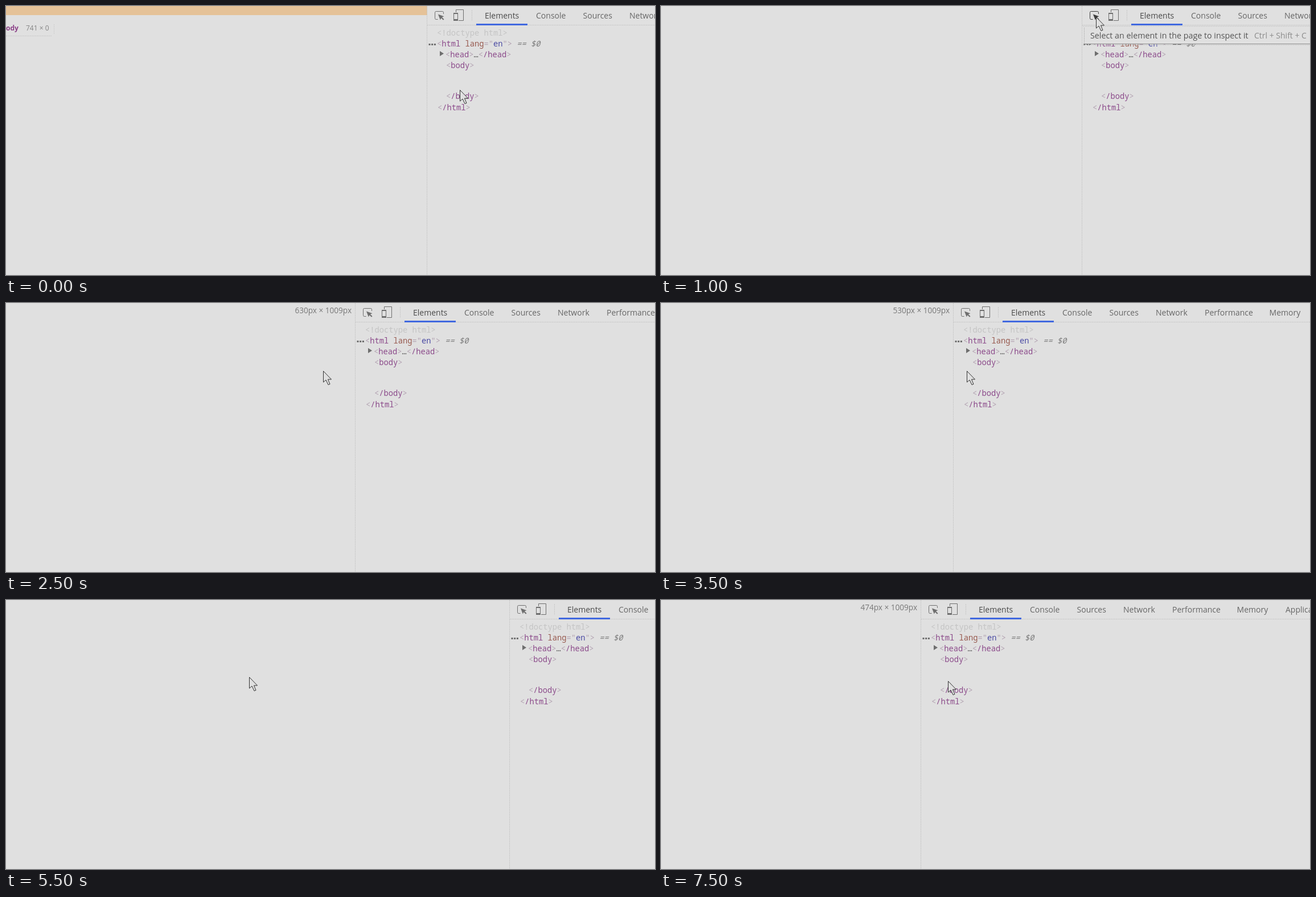
An HTML page with a canvas for the animation above (8 s loop, 1140 px wide and 472 px high).

```html
<!DOCTYPE html>
<html lang="en">
<head>
<meta charset="utf-8">
<title>Resizing the inspector</title>
<style>
  html, body { margin: 0; width: 100%; height: 100%; overflow: hidden; background: #e0e0e0; }
  canvas { display: block; width: 1140px; height: 472px; }
</style>
</head>
<body>
<canvas id="stage" width="1140" height="472"></canvas>
<script>
const ctx = document.getElementById('stage').getContext('2d');
const W = 1140, H = 472, LOOP = 8000;
const BG = '#e0e0e0', RULE = '#c6c6c6', ICON = '#6e6e6e', DARK = '#3c3c3c';
const SANS = '"Open Sans", "Noto Sans", sans-serif';
const MONO = '13.75px "Noto Sans Mono", "DejaVu Sans Mono", monospace';
const CHAR = 8.25;
const INK = {
  b: '#b3a3b2', t: '#8b4a8a', a: '#97594e', v: '#4a4aa3', g: '#c4c4c4', n: '#7c7c7c', d: '#555'
};

// edge: left side of the inspector; x, y: pointer tip
const steps = [
  { t: 0,    edge: 740, x: 797,  y: 147, body: true },
  { t: 500,  edge: 740, x: 1038, y: 6 },
  { t: 1000, edge: 740, x: 764,  y: 19, hint: true },
  { t: 1500, edge: 740, x: 732,  y: 115 },
  { t: 2000, edge: 740, x: 741,  y: 119 },
  { t: 2500, edge: 614, x: 557,  y: 119, size: 630 },
  { t: 3500, edge: 514, x: 537,  y: 119, size: 530 },
  { t: 4500, edge: 790, x: 840,  y: 127, size: 807 },
  { t: 5500, edge: 885, x: 427,  y: 135 },
  { t: 6500, edge: 285, x: 277,  y: 135, size: 302, red: true },
  { t: 7500, edge: 457, x: 504,  y: 142, size: 474 }
];

const tabs = [['Elements', 101], ['Console', 191], ['Sources', 273.5], ['Network', 355],
  ['Performance', 441], ['Memory', 554.5], ['Application', 640], ['Security', 745], ['Audits', 827.5]];

// x offset, baseline, then [ink, text] runs
const code = [
  [17, 52, [['g', '<!doctype html>']]],
  [17, 71, [['b', '<'], ['t', 'html'], ['a', ' lang'], ['b', '="'], ['v', 'en'], ['b', '">'], ['n', ' == $0', 'italic ']]],
  [32, 90, [['b', '<'], ['t', 'head'], ['b', '>'], ['d', '…'], ['b', '<'], ['t', '/head'], ['b', '>']]],
  [33, 109, [['b', '<'], ['t', 'body'], ['b', '>']]],
  [33, 163, [['b', '<'], ['t', '/body'], ['b', '>']]],
  [18, 183, [['b', '<'], ['t', '/html'], ['b', '>']]]
];

function rect(x, y, w, h, color) {
  ctx.fillStyle = color;
  ctx.fillRect(x, y, w, h);
}

function text(str, x, y, font, color, align = 'left') {
  ctx.font = font;
  ctx.fillStyle = color;
  ctx.textAlign = align;
  ctx.fillText(str, x, y);
}

function path(points, closed = true) {
  ctx.beginPath();
  points.forEach(([x, y]) => ctx.lineTo(x, y));
  if (closed) ctx.closePath();
}

function dotted(x1, y1, x2, y2, color = RULE) {
  ctx.strokeStyle = color;
  ctx.lineWidth = 1;
  ctx.setLineDash([2, 1]);
  path([[x1, y1], [x2, y2]], false);
  ctx.stroke();
  ctx.setLineDash([]);
}

function pickIcon(color) {
  ctx.strokeStyle = ctx.fillStyle = color;
  ctx.lineWidth = 1;
  ctx.beginPath();
  ctx.moveTo(18.5, 23.5);
  ctx.lineTo(15.5, 23.5);
  ctx.arcTo(13.5, 23.5, 13.5, 21.5, 2);
  ctx.arcTo(13.5, 9.5, 15.5, 9.5, 2);
  ctx.arcTo(28.5, 9.5, 28.5, 11.5, 2);
  ctx.lineTo(28.5, 14);
  ctx.stroke();
  path([[19, 14.5], [29.5, 18.3], [25.8, 19.8], [29.5, 23.3], [28, 24.8], [24.5, 21.2], [22.8, 24.6]]);
  ctx.fill();
}

function deviceIcon() {
  ctx.strokeStyle = ICON;
  ctx.lineWidth = 1;
  path([[50.5, 11], [50.5, 6.5], [63.5, 6.5], [63.5, 25.5], [55, 25.5]], false);
  ctx.stroke();
  ctx.strokeRect(46.5, 12.5, 7, 13);
  rect(46, 12, 8, 2, ICON);
  rect(46, 23, 8, 3, ICON);
}

function inspector(s) {
  ctx.save();
  ctx.translate(s.edge, 0);
  rect(0, 0, W, H, BG);
  dotted(-0.5, 0, -0.5, H);
  dotted(0, 33.5, W - s.edge, 33.5);
  pickIcon(s.hint ? DARK : ICON);
  deviceIcon();
  dotted(78.5, 7, 78.5, 26);
  for (const [name, x] of tabs) text(name, x, 22, '14px ' + SANS, name === 'Elements' ? '#4a4a4a' : '#666');
  rect(86, 31, 90, 3, '#4169df');

  for (const [x0, y, runs] of code) {
    let x = x0;
    for (const [ink, str, style = ''] of runs) {
      text(str, x, y, style + MONO, INK[ink]);
      x += str.length * CHAR;
    }
  }
  for (let i = 0; i < 3; i++) rect(2.5 + i * 4.7, 66, 3, 3, ICON);
  path([[22, 79], [29, 83.5], [22, 88]]);
  ctx.fillStyle = ICON;
  ctx.fill();
  ctx.restore();
}

function bodyHighlight() {
  rect(0, 0, 740, 16, '#e5c298');
  text('ody', 0, 43, 'bold 12px ' + SANS, '#8b3f87');
  text('741 × 0', 35, 43, '12px ' + SANS, '#858585');
  dotted(0, 52.5, 81, 52.5, '#c8c8c8');
  dotted(84.5, 32, 84.5, 50, '#cecece');
}

function hint() {
  rect(743, 37, W - 743, 30, BG);
  dotted(741, 35.5, W, 35.5);
  dotted(743.5, 38, 743.5, 66, '#b4b4b4');
  rect(743, 66, W - 743, 1, '#8f8f8f');
  dotted(741, 68.5, W, 68.5);
  text('Select an element in the page to inspect it', 754, 57, '14.3px ' + SANS, '#555');
  text('Ctrl + Shift + C', 1042, 57, '14px ' + SANS, '#8c8c8c');
}

function sizeLabel(s) {
  if (s.red) rect(173, 0, s.edge - 174, 25, '#e1b5b5');
  text(s.size + 'px × 1009px', s.edge - 7, 18, '13.6px ' + SANS, '#787878', 'right');
}

function pointer(x, y) {
  ctx.save();
  ctx.translate(x + 0.5, y + 0.5);
  path([[0, 0], [0, 19.5], [4.5, 15.5], [8.5, 24], [11.5, 22.8], [8, 14.5], [14, 14.5]]);
  ctx.fillStyle = BG;
  ctx.fill();
  ctx.strokeStyle = '#333';
  ctx.lineWidth = 1;
  ctx.stroke();
  ctx.restore();
}

function draw(t) {
  const s = steps.findLast(step => step.t <= t);
  rect(0, 0, W, H, s.red ? '#e04141' : BG);
  if (s.body) bodyHighlight();
  if (s.size) sizeLabel(s);
  inspector(s);
  if (s.hint) hint();
  pointer(s.x, s.y);
}

const start = performance.now();
function tick() {
  draw((performance.now() - start) % LOOP);
  requestAnimationFrame(tick);
}
tick();
</script>
</body>
</html>
```
